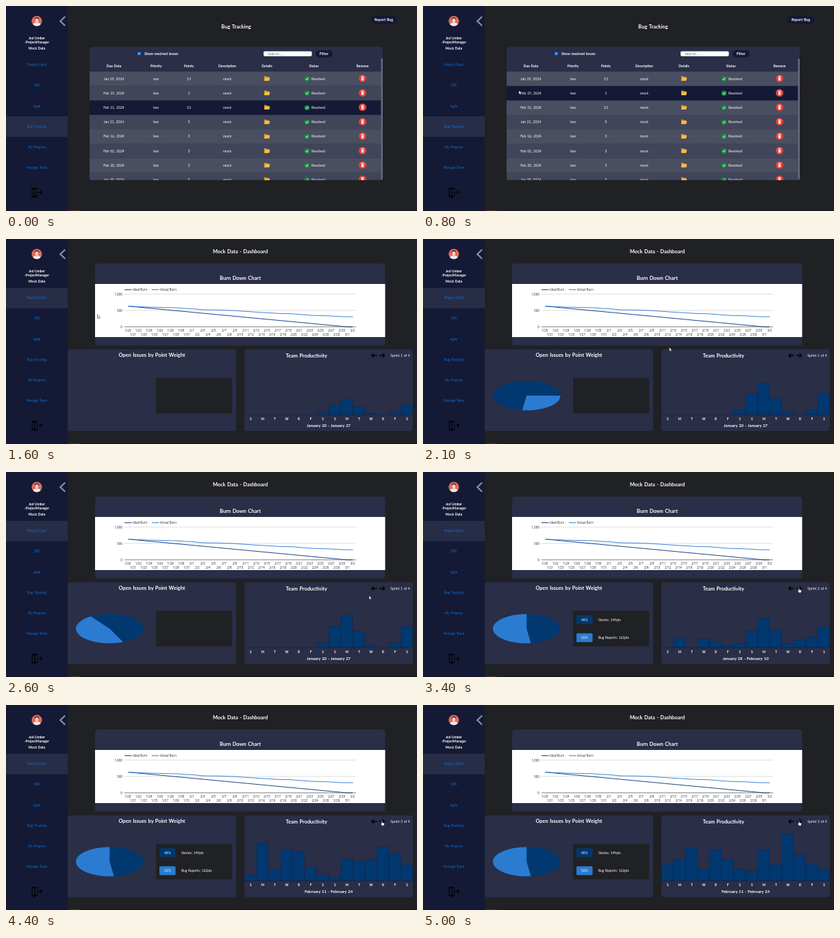
Animation of 600 by 301 pixels, one loop 5.1 s. Source, as an HTML page:

```html
<!DOCTYPE html>
<html lang="en">
<head>
<meta charset="utf-8">
<title>Project dashboard</title>
<style>
  html, body { margin: 0; width: 100%; height: 100%; overflow: hidden; background: #202124; }
  svg { display: block; width: 600px; height: 301px; }
  text { font-family: Lato, "Open Sans", sans-serif; word-spacing: .09em; white-space: pre; }
  .axis { font-family: "Open Sans", "Liberation Sans", sans-serif; word-spacing: 0; }
  .mono { font-family: "DejaVu Sans Mono", monospace; }
</style>
</head>
<body>
<svg id="stage" viewBox="0 0 600 301">
  <g id="table"></g>
  <g id="dash"></g>
  <g id="side"></g>
  <g id="pointer"></g>
</svg>
<script>
const LOOP = 5100, STEP = 100, DASH_AT = 1600;
const NAVY = '#141a35', PANEL = '#2a2e47', ACTIVE = '#282d47', DARK = '#01386f', LIGHT = '#2b7cd0';
const layer = id => document.getElementById(id);

// Markup helpers; text is placed by its vertical middle.
const rect = (x, y, w, h, fill, r = 0, more = '') =>
  `<rect x="${x}" y="${y}" width="${w}" height="${h}" rx="${r}" fill="${fill}" ${more}/>`;
const circle = (x, y, r, fill) => `<circle cx="${x}" cy="${y}" r="${r}" fill="${fill}"/>`;
const path = (d, fill, stroke = 'none', w = 1, more = '') =>
  `<path d="${d}" fill="${fill}" stroke="${stroke}" stroke-width="${w}" ${more}/>`;
const text = (x, y, s, size = 5, { fill = '#fff', weight = 400, anchor = 'middle', cls = '' } = {}) =>
  `<text x="${x}" y="${y + size * .35}" font-size="${size}" font-weight="${weight}" fill="${fill}" text-anchor="${anchor}" class="${cls}">${s}</text>`;
const bold = (x, y, s, size) => text(x, y, s, size, { weight: 700 });
const at = (x, y, body) => `<g transform="translate(${x} ${y})">${body}</g>`;
const clamp = v => Math.min(1, Math.max(0, v));
const swing = v => .5 - Math.cos(Math.PI * clamp(v)) / 2;

// Sidebar
const links = ['Project Dash', 'SRS', 'Agile', 'Bug Tracking', 'My Projects', 'Manage Team'];
function drawSide(active) {
  return rect(0, 0, 90, 301, NAVY)
    + active.map(i => rect(0, 71.7 + 30.1 * i, 90, 30, ACTIVE)).join('')
    + circle(45, 22, 7.6, '#e9675c')
    + path('M39.5 27.2q.5-3 5.5-3t5.5 3a7.6 7.6 0 0 1-11 0z', '#e8eef2')
    + rect(43.6, 21.5, 2.8, 4, '#f2c6a5', 1)
    + circle(45, 19.8, 3.2, '#3a3440') + circle(45, 20.9, 2.6, '#f7d3b5')
    + path('M86.3 15.5L79.3 22.2L86.3 29', 'none', '#8e909e', 2.2)
    + text(45, 47.4, 'Jed Umber', 4.9, { weight: 700 })
    + text(45, 53.6, '-ProjectManager', 4.8, { weight: 700 })
    + text(45, 62.6, 'Mock Data', 4.9, { weight: 700 })
    + links.map((s, i) => text(45, 86.6 + 30.1 * i, s, 5, { fill: '#0670dc' })).join('')
    + path('M45.5 271V267.6H38.2V279.6H45.5V276.5M38.2 267.6L42.3 269.5V281.6L38.2 279.6M44.5 273.8H52.3M49.8 271.2L52.5 273.8L49.8 276.4', 'none', '#000', 1.1);
}

// Issue table
const issues = [['Jan 29', 13], ['Feb 19', 1], ['Feb 11', 13], ['Jan 21', 5],
                ['Feb 16', 3], ['Feb 02', 3], ['Feb 20', 3], ['Jan 30', 5]];
const columns = { 'Due Date': 157.5, Priority: 219, Points: 267, Description: 323, Details: 381, Status: 449.5, Remove: 520.5 };
const ROW_TOP = 96.3, ROW_H = 21.2;

const folder = path('M-4-3.2h2.8l1 1h3.2v1.2h1.2l-1.2 4.4h-7z', '#d99a2b') + path('M-2.8-.9h7.2l-1.4 4.3h-7z', '#f8bd4a');
const tick = circle(0, 0, 3.6, '#129a3c') + path('M-1.8.1L-.5 1.5L1.9-1.4', 'none', '#fff', 1);
const bin = circle(0, 0, 5.6, '#e23d36') + path('M-2.5-2.6h5M-.9-3.2h1.8', 'none', '#fff', .8) + path('M-2-1.6h4l-.3 4.9h-3.4z', '#f6dcda');

function drawTable(hover) {
  const rows = issues.map(([day, points], i) => {
    const y = ROW_TOP + ROW_H * i, mid = y + 10.6;
    return rect(122, y, 425.5, ROW_H + .1, i === hover ? NAVY : i % 2 ? '#414559' : '#4a4e61')
      + text(157.5, mid, day + ', 2024', 5.1) + text(219, mid, 'low', 5.1)
      + text(267, mid, points, 5.1) + text(323, mid, 'mock', 5.1)
      + at(381, mid - .6, folder) + at(439.4, mid, tick)
      + text(446, mid, 'Resolved', 5, { anchor: 'start' }) + at(520.5, mid - .6, bin);
  }).join('');
  return bold(336, 30.2, 'Bug Tracking', 7.5)
    + rect(532.5, 14, 38.5, 12.4, NAVY, 5) + bold(551.6, 20.2, 'Report Bug', 5.3)
    + `<clipPath id="frame">${rect(122, 60, 428, 195.5, '#000', 3)}</clipPath><g clip-path="url(#frame)">`
    + rect(122, 60, 428, 196, PANEL) + rows + rect(547.5, 77, 2.5, 179, '#666a7a', 1) + '</g>'
    + rect(192, 67.5, 4.8, 4.8, '#1673e6', .8) + path('M193.1 70l1 1l1.8-2.2', 'none', '#fff', .7)
    + text(202, 70.2, 'Show resolved issues', 5.2, { weight: 700, anchor: 'start' })
    + rect(376, 66.5, 70.5, 7.2, '#fff', 1.8)
    + text(382, 70.2, 'search...', 4.7, { fill: '#555', anchor: 'start', cls: 'mono' })
    + rect(452, 65, 24.5, 10.4, NAVY, 4.5) + bold(464.2, 70.2, 'Filter', 5.5)
    + Object.entries(columns).map(([s, x]) => bold(x, 88.2, s, 5)).join('');
}

// Burn down chart
function drawBurn() {
  const ink = { fill: '#222', cls: 'axis' };
  const left = { ...ink, anchor: 'start' }, right = { ...ink, anchor: 'end' };
  let s = rect(130, 36, 423.5, 120.5, PANEL, 4) + rect(130, 66, 423.5, 78, '#fff')
    + bold(342, 57.2, 'Burn Down Chart', 7.5)
    + rect(173, 74, 10.5, 1, '#1c4587') + text(185, 74.4, 'Ideal Burn', 4.4, left)
    + rect(213, 74, 10.5, 1, '#3c86d8') + text(225, 74.4, 'Actual Burn', 4.4, left);
  ['1,000', '500', '0'].forEach((label, i) => {
    s += rect(173, 80.6 + 24 * i, 338, .7, i < 2 ? '#ccc' : '#444') + text(169.8, 81 + 24 * i, label, 4.5, right);
  });
  for (let day = 0; day <= 42; day++) {
    const n = day + 20, label = n <= 31 ? '1/' + n : n <= 60 ? '2/' + (n - 31) : '3/' + (n - 60);
    s += text(177.6 + 7.82 * day, day % 2 ? 140 : 134.2, label, 4.4, ink);
  }
  return s + path('M178 98.6L498 129H506', 'none', '#1c4587', 1)
    + path('M178 98.6L208 100L250 101L262 102L270 102.1L288 104L312 104.3L332 105L360 107L400 109.4L416 109.7L446 112.1L470 112.8L490 114L506.500 114.2', 'none', '#3c86d8', 1);
}

// Pie with a swept second slice
function drawPie(t) {
  if (t < 1700) return '';
  const p = 1 - (1 - clamp((t - 1700) / 1300)) ** 2;
  const cx = 151.3, cy = 230, rx = 49.3, ry = 21.6;
  const edge = deg => {
    const a = deg * Math.PI / 180;
    return `${cx + rx * Math.sin(a)} ${cy - ry * Math.cos(a)}`;
  };
  const from = 172.8 * p, to = 360 * p;
  return `<ellipse cx="${cx}" cy="${cy}" rx="${rx}" ry="${ry}" fill="${DARK}"/>`
    + path(`M${cx} ${cy}L${edge(from)}A${rx} ${ry} 0 ${+(to - from > 180)} 1 ${edge(to)}z`, LIGHT);
}

function drawIssues(t) {
  const entry = (y, share, label, fill) => rect(224, y, 23.5, 13, fill, 1.5)
    + text(235.8, y + 6.7, share, 4.8) + text(256, y + 6.7, label, 4.9, { anchor: 'start' });
  return rect(90, 162, 246, 120, PANEL, 4) + bold(213, 170.2, 'Open Issues by Point Weight', 7.4)
    + drawPie(t) + rect(219, 204, 111, 52, '#202124')
    + (t < 3000 ? '' : entry(210.3, '48%', 'Stories: 149pts', DARK) + entry(236.700, '52%', 'Bug Reports: 162pts', LIGHT));
}

// Team productivity: bars ease from one sprint's heights to the next
const sprints = [
  { start: 1360, dates: 'January 20 - January 27', bars: [0, 0, 0, 0, 0, 0, 7, 31, 47, 24, 4, 0, 7, 31] },
  { start: 3250, dates: 'January 28 - February 10', bars: [0, 68, 0, 62, 41, 14, 4, 0, 24, 31, 11, 55, 48, 27] },
  { start: 4200, dates: 'February 11 - February 24', bars: [24, 31, 48, 17, 45, 31, 17, 14, 45, 24, 68, 38, 24, 17] },
];
function drawTeam(t) {
  const index = sprints.filter(s => t >= s.start).length - 1;
  const { start, dates, bars } = sprints[Math.max(0, index)];
  const before = index > 0 ? sprints[index - 1].bars : bars.map(() => 0);
  const p = swing((t - start) / 500), w = 17.57;
  let s = rect(348, 162, 246, 120, PANEL, 4) + bold(438.8, 171.2, 'Team Productivity', 7.4)
    + path('M541.5 171H534M537 168L534 171L537 174M545 171H552.5M549.5 168L552.5 171L549.5 174', 'none', '#000', 1.3)
    + text(575.5, 171.2, 'Sprint ' + (Math.max(0, index) + 1) + ' of 4', 5);
  bars.forEach((h, i) => {
    const height = before[i] + (h - before[i]) * p, x = 348 + w * i;
    if (height > .1) s += rect(x + .3, 258 - height, w - .6, height, DARK, 0, 'stroke="#0c2a55" stroke-width=".6"');
    s += bold(x + 9.2, 264.8, 'SMTWRFS'[i % 7], 4.7);
  });
  return s + rect(348, 257.7, 246, .6, '#14203f') + bold(471, 274.2, dates, 5.9);
}

// Pointer: [time, x, y] stops
const stops = [[500, 230, 152], [600, 215, 164], [700, 180, 152], [800, 140, 124], [900, 106, 106], [1000, 88, 98],
               [1500, 88, 98], [1600, 133.5, 110.5], [2000, 310, 150], [2400, 508, 186], [2600, 530, 181.500],
               [2800, 536, 177], [3100, 548, 170]];
function pointerAt(t) {
  const k = stops.findIndex(s => s[0] > t);
  if (k < 0) return stops[stops.length - 1].slice(1);
  if (k === 0) return null;
  const [t0, x0, y0] = stops[k - 1], [t1, x1, y1] = stops[k], p = (t - t0) / (t1 - t0);
  return [x0 + (x1 - x0) * p, y0 + (y1 - y0) * p];
}
const arrow = path('M0 0V5.6L1.3 4.5L2.2 6.5L3.1 6.1L2.200 4.200H4z', '#fff', '#222', .5);
const hand = path('M.2.6Q.8-.2 1.400.6V2.700L3.800 3.200Q4.600 3.500 4.400 4.800L3.800 7.300H.8L-1 4.600Q-1 3.700.2 4.300z', '#fff', '#111', .5);

const taskbar = rect(0, 300, 600, 1, '#15161b') + rect(92, 300, 16, 1, '#4b302b');
const burn = bold(342, 18.2, 'Mock Data - Dashboard', 7.4) + drawBurn();

function render(t) {
  const dash = t >= DASH_AT, pos = pointerAt(t);
  const overSide = pos && pos[0] < 90;
  let hover = 2;
  if (pos) hover = pos[0] > 122 ? Math.floor((pos[1] - ROW_TOP) / ROW_H) : -1;
  layer('table').innerHTML = dash ? '' : drawTable(hover);
  layer('dash').innerHTML = dash ? burn + drawIssues(t) + drawTeam(t) : '';
  layer('side').innerHTML = drawSide(dash ? [0] : overSide ? [0, 3] : [3]) + taskbar;
  layer('pointer').innerHTML = pos ? at(...pos, overSide || t >= 3100 ? hand : arrow) : '';
}

let shown = -1;
function tickFrame(now) {
  const t = Math.floor(now % LOOP / STEP) * STEP;
  if (t !== shown) render(shown = t);
  requestAnimationFrame(tickFrame);
}
render(0);
requestAnimationFrame(tickFrame);
</script>
</body>
</html>
```
